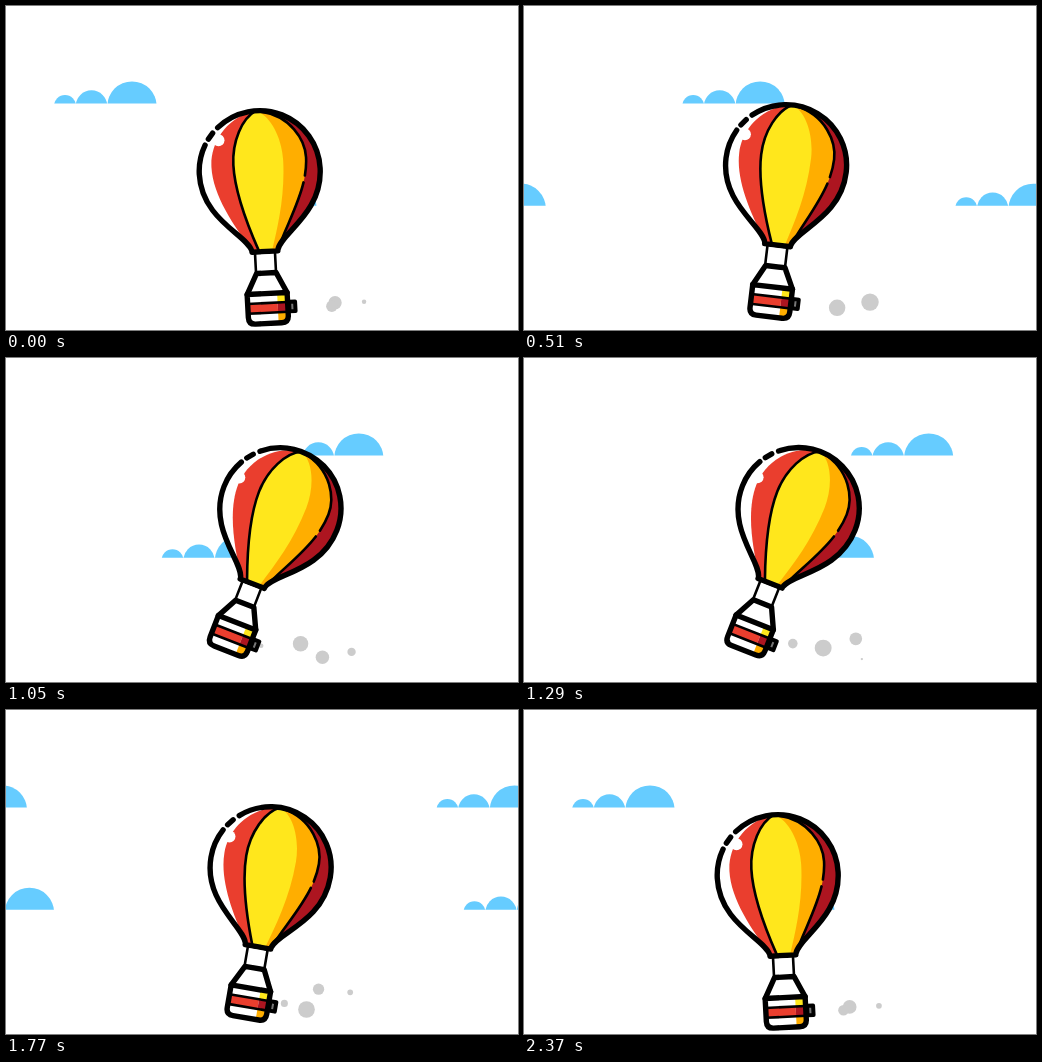
These frames come from a looping animation (512x324 px, 2400 ms). An HTML page:

```html
<!DOCTYPE html>
<html lang="en">
<head>
<meta charset="utf-8">
<title>Hot air balloon</title>
<style>
  html, body { margin: 0; width: 100%; height: 100%; overflow: hidden; background: #fff; }
  svg { display: block; width: 512px; height: 324px; }
  .ink { fill: none; stroke: #000; stroke-width: 5.4; stroke-linecap: round; stroke-linejoin: round; }
  .thin { stroke-width: 2.6; }
</style>
</head>
<body>
<svg viewBox="0 0 512 324">
  <defs>
    <clipPath id="ground"><rect y="-30" width="103" height="27.5"/></clipPath>
    <g id="cloud" clip-path="url(#ground)" fill="#66ccff">
      <circle cx="11" r="11"/><circle cx="37.5" r="15.7"/><circle cx="78" r="24.6"/>
    </g>
    <path id="skin" d="M244 243C241 227 195.5 209 195.5 163.5A60.5 60.5 0 0 1 316.5 163.5C316.5 209 273 227 270 243Z"/>
    <clipPath id="inside"><use href="#skin"/></clipPath>
    <path id="tub" d="M237 286H277V309Q277 316 270 316H244Q237 316 237 309Z"/>
    <clipPath id="intub"><use href="#tub"/></clipPath>
  </defs>
  <g id="clouds"></g>
  <g id="smoke" fill="#ccc"></g>
  <g id="balloon">
    <use href="#skin" fill="#fff"/>
    <g clip-path="url(#inside)">
      <path fill="#ea3e2e" d="M252 103C222 111 208 135 208 157C208 185 227 217 246 244H256V103Z"/>
      <path fill="#ad1520" d="M258 103H320V200L270 245Z"/>
      <path fill="#ffae00" d="M256 103C290 109 303 135 303 152C303 185 281 215 270 244H256Z"/>
      <path fill="#ffe71c" d="M255 103C241 110 230 132 230 156C230 186 243 222 251 244H264C271 220 280 190 280 154C280 132 270 108 255 103Z"/>
      <circle id="shine" cx="214.8" cy="132.5" r="6" fill="#fff"/>
    </g>
    <path class="ink thin" d="M255 103C241 110 230 132 230 156C230 186 243 222 251 243"/>
    <path class="ink thin" stroke-dasharray="90 7 200" d="M258 103.5C290 109 303 135 303 152C303 185 281 215 270 243"/>
    <path class="ink" d="M216.3 117.8A60.5 60.5 0 0 1 316.5 163.5C316.5 209 273 227 270 243M206.4 128.8L211 123M202.8 134.6A60.5 60.5 0 0 0 195.5 163.5C195.5 209 241 227 244 243M244 244H270"/>
    <path fill="#fff" d="M247 247H267V266L277 286H237L247 266Z"/>
    <path class="ink thin" d="M247 246V265M267 246V265"/>
    <path class="ink" d="M237 286L247.5 265.5H267L277 286"/>
    <rect x="278.5" y="295.5" width="6" height="9.5" fill="#777" stroke="#000" stroke-width="4" stroke-linejoin="round"/>
    <use href="#tub" fill="#fff"/>
    <g clip-path="url(#intub)">
      <path fill="#ffe71c" d="M267 286h10v10h-10z"/>
      <path fill="#ffae00" d="M267 305h10v12h-10z"/>
      <path fill="#ea3e2e" d="M237 296h30v9h-30z"/>
      <path fill="#ad1520" d="M267 296h10v9h-10z"/>
    </g>
    <path class="ink thin" d="M237 295.5H277M237 305.3H277"/>
    <use href="#tub" class="ink"/>
  </g>
</svg>
<script>
const LOOP = 2400, STEP = 30, LAST = LOOP - STEP, WIDTH = 512, PUFFS = 14;
const PIVOT = { x: 256.3, y: 163.3 }, NOZZLE = { x: 283, y: 300 };

const $ = id => document.getElementById(id);

function add(parent, tag, attrs = {}) {
  const el = document.createElementNS("http://www.w3.org/2000/svg", tag);
  for (const k in attrs) el.setAttribute(k, attrs[k]);
  return parent.appendChild(el);
}

let seed = 7;
function random(min, max) {
  seed = seed * 16807 % 2147483647;
  return min + (max - min) * seed / 2147483647;
}

// The balloon swings right and back once per loop.
function pose(t) {
  const u = (1 - Math.cos(2 * Math.PI * t / LAST)) / 2;
  return { x: 254 + 21.5 * u, y: 165 - 15.3 * u, deg: -3 + 25 * u };
}

function nozzleAt(t) {
  const { x, y, deg } = pose(t), a = deg * Math.PI / 180;
  const dx = NOZZLE.x - PIVOT.x, dy = NOZZLE.y - PIVOT.y;
  return {
    x: x + dx * Math.cos(a) - dy * Math.sin(a),
    y: y + dx * Math.sin(a) + dy * Math.cos(a)
  };
}

// Puffs leave the nozzle at a steady rate, slow down, swell and vanish.
const puffs = Array.from({ length: PUFFS }, (_, i) => {
  const born = i * LOOP / PUFFS;
  return {
    born, from: nozzleAt(born), life: random(480, 720),
    dx: random(75, 110), dy: random(-18, 18), size: random(5, 11),
    el: add($("smoke"), "circle")
  };
});

function drawPuff({ born, from, life, dx, dy, size, el }, t) {
  const s = Math.min(1, (t - born + LOOP) % LOOP / life);
  const way = s * (1.5 - 0.5 * s);
  el.setAttribute("cx", from.x + dx * way);
  el.setAttribute("cy", from.y + dy * way);
  el.setAttribute("r", Math.max(0, size * Math.sin(Math.PI * s ** 0.7)));
}

// Each row is drawn twice, one stage width apart, so it wraps around.
function cloudRow(y) {
  const pair = [0, 1].map(() => add($("clouds"), "use", { href: "#cloud" }));
  return x => pair.forEach((el, i) => el.setAttribute("transform", `translate(${x - WIDTH * i} ${y})`));
}
const high = cloudRow(100), low = cloudRow(202.3);

function draw(now) {
  const t = Math.floor(now % LOOP / STEP) * STEP;
  high(48 + WIDTH * t / LAST);
  low(208 + WIDTH * (t % (LOOP / 2)) / (LOOP / 2 - STEP));
  const { x, y, deg } = pose(t);
  $("balloon").setAttribute("transform",
    `translate(${x} ${y}) rotate(${deg}) translate(${-PIVOT.x} ${-PIVOT.y})`);
  // The shine keeps facing the light.
  $("shine").setAttribute("transform", `rotate(${-deg} ${PIVOT.x} ${PIVOT.y})`);
  puffs.forEach(p => drawPuff(p, t));
}

let start;
function tick(now) {
  start ??= now;
  draw(now - start);
  requestAnimationFrame(tick);
}
draw(0);
requestAnimationFrame(tick);
</script>
</body>
</html>
```
